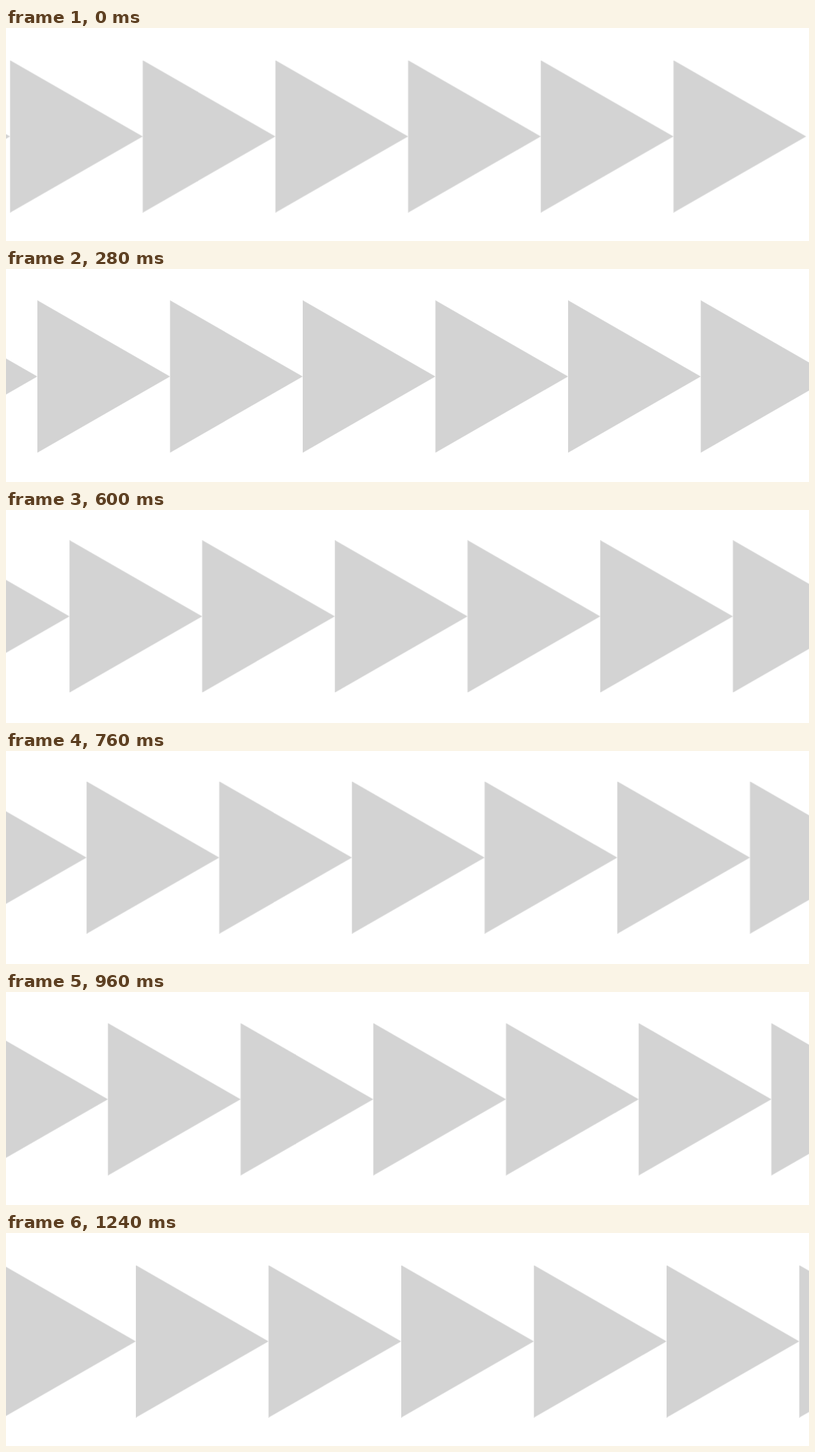
These frames come from a looping animation (1280 by 341 pixels, 1.28 s). An HTML page:

```html
<!DOCTYPE html>
<html lang="en">
<head>
<meta charset="utf-8">
<title>Marching triangles</title>
<style>
  html, body { margin: 0; width: 100%; height: 100%; overflow: hidden; background: #fff; }
  svg { display: block; width: 1280px; height: 341px; }
  #row { fill: #d3d3d3; animation: march 1280ms infinite; }

  /* Moves in 40 ms ticks: one pitch to the right, with a slight rise and fall. */
  @keyframes march {
    0%      { transform: translate(6.5px, 173.6px);   animation-timing-function: steps(7); }
    21.875% { transform: translate(50px, 172.1px);    animation-timing-function: steps(5); }
    37.5%   { transform: translate(83.7px, 170.8px);  animation-timing-function: steps(3); }
    46.875% { transform: translate(101.2px, 170.3px); animation-timing-function: steps(4); }
    59.375% { transform: translate(128.4px, 170.6px); animation-timing-function: steps(5); }
    75%     { transform: translate(162.5px, 171.7px); animation-timing-function: steps(7); }
    96.875% { transform: translate(207px, 173.5px);   animation-timing-function: steps(1); }
    100%    { transform: translate(218px, 173.6px); }
  }
</style>
</head>
<body>
<svg viewBox="0 0 1280 341">
  <defs><path id="tri" d="M0-122 211.5 0 0 122z"/></defs>
  <g id="row">
    <use href="#tri" x="-211.5"/>
    <use href="#tri"/>
    <use href="#tri" x="211.5"/>
    <use href="#tri" x="423"/>
    <use href="#tri" x="634.5"/>
    <use href="#tri" x="846"/>
    <use href="#tri" x="1057.5"/>
  </g>
</svg>
</body>
</html>
```
